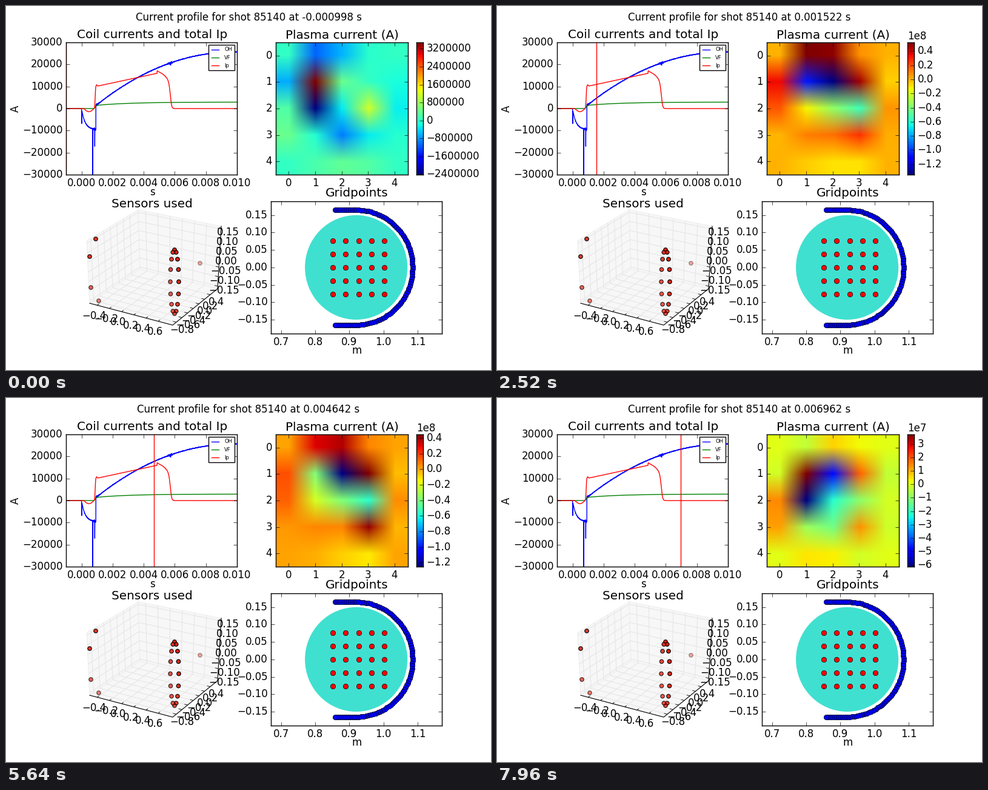
Recreate the animation shown at these times as a matplotlib script. Size 800x600 px, loop 8000 ms.

```python
import numpy as np
import matplotlib.pyplot as plt
from matplotlib.animation import FuncAnimation
from matplotlib.collections import LineCollection
from matplotlib.patches import Ellipse, Polygon

W, H, FRAMES, STEP = 800, 600, 200, 40
plt.style.use("classic")
plt.rcParams.update({
    "figure.dpi": 100, "savefig.dpi": "figure", "figure.facecolor": "w",
    "font.family": "DejaVu Sans", "font.size": 12, "xtick.major.pad": 3.4,
})
fig = plt.figure(figsize=(W / 100, H / 100))


def panel(x, y, w, h):
    """Axes placed by the top-left corner, in pixels."""
    return fig.add_axes([x / W, 1 - (y + h) / H, w / W, h / H])


def minus(text):
    return text.replace("-", "\u2212")


stage = panel(0, 0, W, H)
stage.set(xlim=(0, W), ylim=(H, 0))
stage.axis("off")


def label(x, y, text, size=12, va="baseline", ha="center", **kw):
    return stage.text(x, y, text, size=size, va=va, ha=ha, **kw)


# ---- signals, time in ms ----
def step_at(t, t0, width):
    return .5 + .5 * np.tanh((t - t0) / width)


def pulse(t, t0, width):
    return np.exp(-((t - t0) / width) ** 2)


def ip(t):
    """Plasma current: breakdown dip, ramp, late spike, quench."""
    dip = -1400 * np.sin(np.pi * np.clip((t - .15) / .65, 0, 1))
    late = np.maximum(t - 4.88, 0)
    ramp = 10300 + 1510 * (t - 1.1) + 700 * pulse(t, .97, .05) - 8300 * late ** 2
    ramp = ramp + (t > 4.86) * 1100 * np.exp(-late / .15)
    return dip + ramp * step_at(t, .875, .03) * step_at(t, 5.72, -.09)


def oh(t):
    """Ohmic coil: charge, discharge spikes, slow rise."""
    charge = -9500 * (1 - np.exp(-np.maximum(t, 0) / .22))
    for t0, size in ((.01, 6500), (.72, 22000), (.85, 7000)):
        charge = charge - size * pulse(t, t0, .006)
    rise = 25700 - 23900 * np.clip((10 - t) / 9, 0, 1) ** 2.1
    noise = np.random.default_rng(4).normal(0, 1, t.size) * (t > 0)
    level = 60 + 200 * pulse(t, .9, .2) + 450 * pulse(t, 5.7, .12)
    return np.where(t < .92, charge, rise) + noise * level


def vf(t):
    return (2950 - 1450 * np.exp((1 - t) / 2.2)) * step_at(t, .88, .05)


# ---- coil currents ----
ax = panel(99, 60, 281.8, 218.2)
t = np.linspace(-1, 10, 2201)
for curve, color, name in ((oh, "b", "OH"), (vf, "g", "VF"), (ip, "r", "Ip")):
    ax.plot(t / 1000, curve(t), color, label=name)
ax.set(xlim=(-.001, .01), ylim=(-30000, 30000), xticks=np.arange(0, .011, .002))
ax.legend(prop={"size": 6})
cursor = ax.axvline(0, color="r")

# ---- plasma current map and its colour scale ----
N = 218
ax = panel(444.6, 60, 218.2, 218.2)
field_img = ax.imshow(np.zeros((N, N, 3)), extent=(-.5, 4.5, 4.5, -.5),
                      interpolation="nearest", aspect="auto")
ax.set(xticks=range(5), yticks=range(5))

bar = panel(677, 60, 10.9, 218.2)
bar.imshow(np.linspace(0, 1, 256)[:, None], cmap="jet", origin="lower",
           extent=(0, 1, 0, 1), aspect="auto", interpolation="nearest")
bar.set_xticks([])
bar.yaxis.tick_right()

# ---- grid points ----
ax = panel(437.3, 321.8, 281.8, 218.2)
ax.add_patch(Ellipse((.92, 0), .3, .3, fc="turquoise", ec="none"))
arc = np.linspace(np.pi / 2, -np.pi / 2, 72)
flat = np.linspace(.858, .915, 11)
edge = np.full(flat.size, .165)
ax.plot(np.r_[flat, .92 + .165 * np.cos(arc), flat[::-1]],
        np.r_[edge, .165 * np.sin(arc), -edge], "bo")
gx, gy = np.meshgrid(.927 + .0378 * np.arange(-2, 3), .0385 * np.arange(-2, 3))
ax.plot(gx.ravel(), gy.ravel(), "ro")
ax.set(xlim=(.671, 1.171), ylim=(-.19, .19), xticks=np.arange(7, 12) / 10,
       yticks=np.arange(-3, 4) * .05)

# ---- sensors: projected box in stage pixels ----
LEFT, FRONT, RIGHT, BACK = map(np.array, [(138, 490), (275, 526), (349, 466), (221, 434)])
LEFT_T, RIGHT_T, BACK_T = map(np.array, [(133, 387), (355, 363), (218, 336)])


def mix(a, b, f):
    return a + (b - a) * f


for corners in ([LEFT, BACK, BACK_T, LEFT_T], [BACK, RIGHT, RIGHT_T, BACK_T],
                [LEFT, FRONT, RIGHT, BACK]):
    stage.add_patch(Polygon(corners, fc="#f7f7f7", ec="#eeeeee", lw=.8))

grid, ticks = [], []


def rulers(count, first, gap, edge, floor, wall, text_at, text_step, start, inc, digits):
    """Grid lines, ticks and numbers along one box edge."""
    for k in range(count):
        p, q, r = (mix(*side, first + gap * k) for side in (edge, floor, wall))
        grid.append([p, q, r])
        ticks.append([p, mix(p, q, .04)])
        x, y = np.array(text_at) + k * np.array(text_step)
        label(x, y, minus(f"{start + inc * k + 1e-9:.{digits}f}"), va="center")


rulers(6, .09, .147, (LEFT, FRONT), (BACK, RIGHT), (BACK_T, RIGHT_T),
       (145, 511), (20.2, 5.2), -.4, .2, 1)
rulers(7, .08, .126, (FRONT, RIGHT), (LEFT, BACK), (LEFT_T, BACK_T),
       (290.5, 534), (9.4, -7.7), -.8, .2, 1)
rulers(7, .04, .153, (RIGHT, RIGHT_T), (BACK, BACK_T), (LEFT, LEFT_T),
       (360, 469), (1.1, -16), -.15, .05, 2)
stage.add_collection(LineCollection(grid, colors="#e6e6e6", linewidths=.8))
stage.add_collection(LineCollection(ticks, colors="k", linewidths=.6))
stage.plot(*np.array([LEFT, FRONT, RIGHT, RIGHT_T]).T, "k", lw=.8)

# a ring of sensors seen nearly edge-on, and five outliers
turn = np.arange(16) * np.pi / 8
ring = np.c_[278 + 7 * np.sin(turn), 454.5 - 52.5 * np.cos(turn),
             .82 + .1 * np.sin(turn) + .08 * np.cos(turn)]
outer = [(320, 424, .35), (140, 464, .65), (153, 486, .55), (148, 384, .85), (138, 413, .85)]
sx, sy, sa = np.r_[outer, ring].T
stage.scatter(sx, sy, s=21, c=[(.95, .08, 0, a) for a in sa],
              edgecolors=[(0, 0, 0, a) for a in sa], linewidths=1, zorder=3)

# ---- captions ----
heading = label(400, 24, "")
label(241, 53, "Coil currents and total Ip", 14.4)
label(554.5, 53, "Plasma current (A)", 14.4)
label(241, 332, "Sensors used", 14.4)
label(578.5, 314, "Gridpoints", 14.4)
label(241, 311.5, "s")
label(578.5, 573, "m")
label(16, 169, "A", va="center", rotation=90)
power = label(677, 55, "", ha="left")


# ---- current maps ----
def vessel(*core):
    """Core currents in units of 1e7 A, with opposing image currents on the rim."""
    z = np.zeros((5, 5))
    z[1:4, 1:4] = core
    for _ in range(4):
        z = np.rot90(z)
        z[0, 1:4] = -.6 * np.convolve(z[1, 1:4], [.25, .5, .25], "same")
    return z * 1e7


NOISE = vessel([.348, .04, 0], [-.242, -.03, .112], [-.01, -.095, -.03])
EARLY = vessel([-10.7, -13.5, 4.6], [-1.3, -3.6, -5.5], [1, 1.3, 2.6])
MID = vessel([-3.3, -10.45, 3.72], [-1.85, -3.3, -4.7], [.4, .4, 3.4])
LATE = vessel([-.5, -5.14, 1.4], [-.65, -1.85, -3], [.1, -.1, 2.24])
DECAY = vessel([3.72, -4.8, 1.8], [-6.14, -2.2, -1], [-.8, -1.3, 1.3])
KEYS = [EARLY, MID, MID * 1.2, LATE, DECAY * 1.2, DECAY]
KEY_T = [1.522, 2.882, 4.642, 5.402, 5.95, 6.962]


def field(t):
    if t <= KEY_T[0]:
        drift = np.interp(t, [-.998, -.078, .8, 1.5], [1, -.194, -.194, 0])
        return drift * NOISE + EARLY * ip(t) / ip(KEY_T[0])
    pos = np.interp(t, KEY_T, range(len(KEYS)))
    i = min(int(pos), len(KEYS) - 2)
    return mix(KEYS[i], KEYS[i + 1], pos - i)


# bilinear weights from five cells to N pixels, clamped at the rim
centre = np.clip((np.arange(N) + .5) / N * 5 - .5, 0, 4)
BLEND = np.clip(1 - abs(centre[:, None] - np.arange(5)), 0, 1)


def nice_ticks(lo, hi, bins=10):
    raw = (hi - lo) / bins
    scale = 10 ** np.floor(np.log10(raw))
    for s in (1, 1.5, 2, 2.5, 3, 4, 5, 6, 8, 10):
        step = s * scale
        first = np.floor(lo / step)
        if step >= raw and (first + bins) * step >= hi:
            break
    at = (first + np.arange(bins + 2)) * step
    return at[(at >= lo) & (at <= hi)], step


def update(k):
    t = -.998 + k * STEP / 1000
    heading.set_text(f"Current profile for shot 85140 at {t / 1000:.6f} s")
    cursor.set_xdata([t / 1000] * 2)

    z = field(t)
    lo, hi = z.min(), z.max()
    rgb = plt.cm.jet((z - lo) / (hi - lo))[..., :3]
    field_img.set_data(np.clip(BLEND @ rgb.transpose(2, 0, 1) @ BLEND.T, 0, 1)
                       .transpose(1, 2, 0))

    at, step = nice_ticks(lo, hi)
    exp = int(np.floor(np.log10(abs(at).max()) + 1e-9))
    exp = exp if exp >= 7 else 0
    s = step / 10 ** exp
    digits = next((d for d in range(3) if abs(round(s, d) - s) < 1e-6), 3) if exp else 0
    bar.set_yticks((at - lo) / (hi - lo))
    bar.set_yticklabels([minus(f"{v / 10 ** exp + 0.0:.{digits}f}") for v in at])
    power.set_text(f"1e{exp}" if exp else "")
    return []


anim = FuncAnimation(fig, update, frames=FRAMES, interval=STEP, init_func=lambda: [],
                     repeat=True, repeat_delay=0, blit=False)
plt.show()
```
